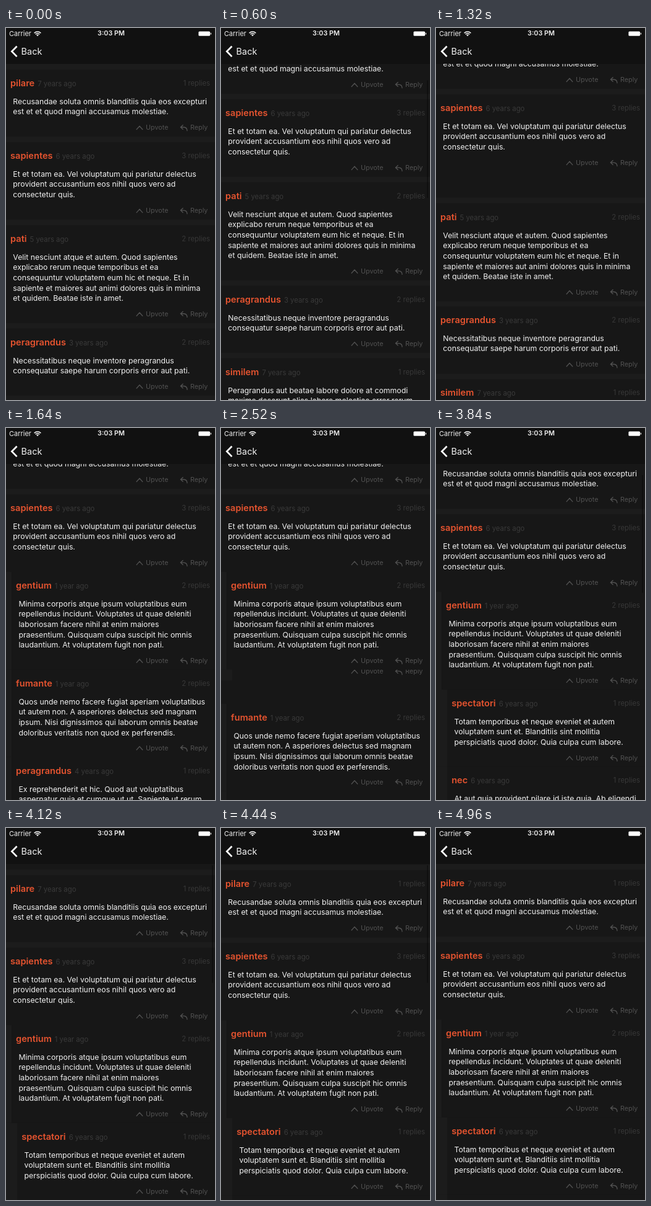
Animation, 338 px wide and 600 px high, one loop 5000 ms. Source, as an HTML page:

```html
<!DOCTYPE html>
<html lang="la">
<head>
<meta charset="utf-8">
<title>Comment thread</title>
<style>
html, body { margin: 0; width: 100%; height: 100%; overflow: hidden; background: #171717; }
body { position: relative; font-family: Inter, "Open Sans", sans-serif; color: #f0f0f0; }
header { position: absolute; inset: 0 0 auto; width: 338px; height: 58px; background: #111; }
header svg { position: absolute; left: 0; top: 0; }
header span { position: absolute; line-height: 20px; white-space: pre; }
.carrier { left: 5px; top: -1px; font-size: 11px; }
.clock { left: 0; width: 340px; top: -1px; text-align: center; font-size: 10.8px; font-weight: 600; }
.back { left: 24.5px; top: 28px; font-size: 14.5px; }
main { position: absolute; left: 0; top: 58px; width: 338px; height: 542px; overflow: hidden; }
#bar { position: absolute; z-index: 99; left: 333px; top: 2px; width: 2px; height: 190px; border-radius: 1px; background: #000; }
article { position: absolute; left: 0; top: 0; width: 338px; background: #171717; white-space: pre; }
article.top { border-top: 9px solid #1c1c1c; }
article > * { position: absolute; }
.head { left: calc(7px + var(--indent)); top: 12px; line-height: 20px; font-size: 11.3px; color: #3a3a3a; }
.head b { margin-right: 5px; font-size: 14.6px; font-weight: 600; color: #e4532f; }
.replies { right: 8px; top: 12px; line-height: 20px; font-size: 11.3px; color: #383838; }
.body { left: calc(11.3px + var(--indent)); top: 43.9px; line-height: 16.55px; font-size: 12.3px; }
.actions { left: 0; bottom: 4px; width: 338px; height: 20px; line-height: 20px; font-size: 10.8px; color: #515151; }
.actions * { position: absolute; }
.actions svg { left: 210px; top: 0; }
</style>
</head>
<body>
<main><div id="list"></div><div id="bar"></div></main>
<header>
  <span class="carrier">Carrier</span><span class="clock">3:03 PM</span><span class="back">Back</span>
  <svg width="338" height="58" fill="none" stroke="#fff">
    <path d="M45.6 8.2a7.6 7.6 0 0 1 10.8 0M47.6 10.2a4.8 4.8 0 0 1 6.8 0" stroke-width="1.5"/>
    <path d="M49.2 11.4a2.6 2.6 0 0 1 3.6 0L51 13.2Z" fill="#fff" stroke="none"/>
    <rect x="311.4" y="5.4" width="18.6" height="7.4" rx="1.6" fill="#fff" stroke="none"/>
    <path d="M331.4 7.7v2.8" stroke-width="1.2"/>
    <path d="M17.6 29.5L9.4 37.8l8.2 8.3" stroke-width="2.7"/>
  </svg>
</header>
<script>
const LOOP = 5000, INDENT = 9.1, BAND = 9;
const row = (name, age, replies, text, kids = [], opensAt = 0) =>
  ({ name, age, replies, lines: text.split('|'), kids, opensAt });

const thread = [
  row('pilare', '7 years', 1, 'Recusandae soluta omnis blanditiis quia eos excepturi|est et et quod magni accusamus molestiae.'),
  row('sapientes', '6 years', 3, 'Et et totam ea. Vel voluptatum qui pariatur delectus|provident accusantium eos nihil quos vero ad|consectetur quis.', [
    row('gentium', '1 year', 2, 'Minima corporis atque ipsum voluptatibus eum|repellendus incidunt. Voluptates ut quae deleniti|laboriosam facere nihil at enim maiores|praesentium. Quisquam culpa suscipit hic omnis|laudantium. At voluptatem fugit non pati.', [
      row('spectatori', '6 years', 1, 'Totam temporibus et neque eveniet et autem|voluptatem sunt et. Blanditiis sint mollitia|perspiciatis quod dolor. Quia culpa cum labore.'),
      row('nec', '6 years', 1, 'At aut quia provident pilare id iste quia. Ab eligendi|laboriosam inventore ut neque enim.')
    ], 2424),
    row('fumante', '1 year', 2, 'Quos unde nemo facere fugiat aperiam voluptatibus|ut autem non. A asperiores delectus sed magnam|ipsum. Nisi dignissimos qui laborum omnis beatae|doloribus veritatis non quod ex perferendis.'),
    row('peragrandus', '4 years', 1, 'Ex reprehenderit et hic. Quod aut voluptatibus|aspernatur quia et cumque ut ut. Sapiente ut rerum|voluptas nisi et.')
  ], 1260),
  row('pati', '5 years', 2, 'Velit nesciunt atque et autem. Quod sapientes|explicabo rerum neque temporibus et ea|consequuntur voluptatem eum hic et neque. Et in|sapiente et maiores aut animi dolores quis in minima|et quidem. Beatae iste in amet.'),
  row('peragrandus', '3 years', 2, 'Necessitatibus neque inventore peragrandus|consequatur saepe harum corporis error aut pati.'),
  row('similem', '7 years', 1, 'Peragrandus aut beatae labore dolore at commodi|maxime deserunt alias labore molestiae error rerum')
];

const list = document.getElementById('list'), bar = document.getElementById('bar');
let layer = 50;

function build(rows, depth) {
  for (const r of rows) {
    const el = r.el = document.createElement('article');
    const height = 75 + 16.55 * r.lines.length, indent = depth * INDENT;
    r.height = height + (depth ? 0 : BAND);
    if (!depth) el.className = 'top';
    el.style.cssText = `height:${height}px;z-index:${layer--};--indent:${indent}px;box-shadow:inset ${indent}px 0 #1c1c1c`;
    el.innerHTML = `<div class="head"><b>${r.name}</b>${r.age} ago</div><div class="replies">${r.replies} replies</div>
<div class="body">${r.lines.join('\n')}</div>
<div class="actions"><svg width="90" height="20" fill="none" stroke="#515151" stroke-width="1.3"><path d="M.8 13L6 7.2 11.2 13M76.5 5.2L72.4 9l4.1 3.8M72.6 9H77.5Q83 9.2 83 15.2"/></svg><span style="left:226px">Upvote</span><span style="left:298px">Reply</span></div>`;
    list.append(el);
    build(r.kids, depth + 1);
  }
}

const progress = (t, start, duration) => Math.min(1, Math.max(0, (t - start) / duration));
const easeOut = x => 1 - (1 - x) ** 3;
const easeInOut = x => (1 - Math.cos(Math.PI * x)) / 2;
const openness = (r, t) => easeInOut(progress(t, r.opensAt, 300));
const total = (rows, t) => rows.reduce((sum, r) => sum + r.height + total(r.kids, t) * openness(r, t), 0);

// Opening replies slide down from behind their parent while later rows make room.
function place(rows, y, t, visible) {
  for (const r of rows) {
    r.el.style.transform = `translateY(${y}px)`;
    r.el.style.visibility = visible ? 'visible' : 'hidden';
    y += r.height;
    if (!r.kids.length) continue;
    const p = openness(r, t), room = total(r.kids, t);
    place(r.kids, y - 1.21 * room * (1 - p), t, visible && p > 0);
    y += room * p;
  }
}

function scrollAt(t) {
  if (t < 3640) return 77 * easeOut(progress(t, 40, 1060));
  if (t < 4200) return 77 - 86 * easeInOut(progress(t, 3640, 480));
  return -9 * (1 - easeOut(progress(t, 4200, 500)));
}

function draw(now) {
  const t = now % LOOP, scroll = scrollAt(t);
  place(thread, -scroll, t, true);
  bar.style.transform = `translateY(${Math.max(0, scroll) * 0.35}px)`;
  bar.style.opacity = 0.35 * (progress(t, 40, 80) - progress(t, 1100, 200)
    + progress(t, 3640, 80) - progress(t, 4650, 200));
  requestAnimationFrame(draw);
}

build(thread, 0);
draw(0);
</script>
</body>
</html>
```
